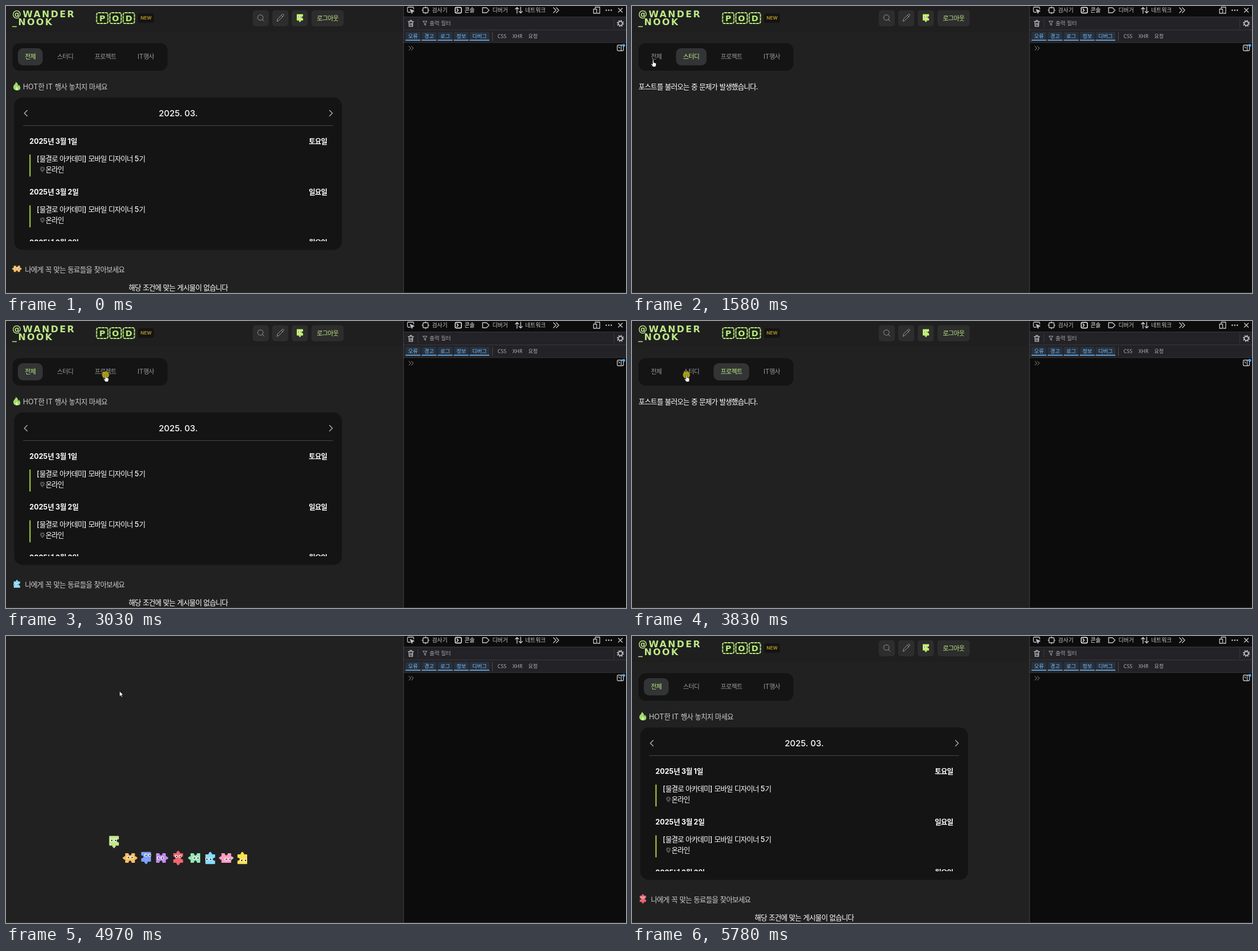
These frames come from a looping animation (1098 px wide and 510 px high, 5850 ms). An HTML page:

```html
<!DOCTYPE html>
<html lang="ko">
<head>
<meta charset="utf-8">
<style>
  html, body { margin: 0; width: 100%; height: 100%; overflow: hidden; background: #212121; }
  svg { display: block; }
  text { font-family: Inter, "Noto Sans CJK KR", "Noto Sans CJK", sans-serif; white-space: pre; }
  .ko { letter-spacing: -.066em; }
  .dev text { font-family: "Noto Sans", "Noto Sans CJK KR", "Noto Sans CJK", sans-serif; }
  .dev .ko { letter-spacing: 0; }
  text.mark { font-family: "DejaVu Sans", sans-serif; font-weight: 700; }
</style>
</head>
<body>
<svg id="stage" width="1098" height="510" viewBox="0 0 1098 510"></svg>
<script>
const LOOP = 5850, BEAT = 200 / 3;
const BG = '#212121', GREEN = '#bde986', LIME = '#a9d83f';

// ---- markup helpers ----
const rect = (x, y, w, h, fill, r = 0, more = '') =>
  `<rect x="${x}" y="${y}" width="${w}" height="${h}" rx="${r}" fill="${fill}" ${more}/>`;
const line = (d, color, w = 1, fill = 'none') =>
  `<path d="${d}" stroke="${color}" stroke-width="${w}" fill="${fill}" stroke-linecap="round" stroke-linejoin="round"/>`;
const dot = (x, y, r, fill, more = '') => `<circle cx="${x}" cy="${y}" r="${r}" fill="${fill}" ${more}/>`;
const group = (x, y, body) => `<g transform="translate(${x} ${y})">${body}</g>`;
// y is the optical middle of the line
const text = (x, y, size, fill, str, more = '') =>
  `<text x="${x}" y="${y + size * .37}" font-size="${size}" fill="${fill}" ${more}>` +
  str.replace(/[가-힣]+/g, run => `<tspan class="ko">${run}</tspan>`) + '</text>';
const MEDIUM = 'font-weight="500"', BOLD = 'font-weight="700"';
const MIDDLE = 'text-anchor="middle"', END = 'text-anchor="end"';

// ---- puzzle pieces: colour, sides (top, right, bottom, left; "+" knob, "-" notch), eye offset ----
const PIECES = [
  ['#c3e88d', '0-+0', -1, -1], ['#fcc062', '-+-+', 0, -1], ['#7da2ff', '00+-', 3, -3],
  ['#c08cf0', '-+-0', -1, 0], ['#ef6671', '+-+-', 0, -3], ['#93e6b5', '-0-+', 1, 0],
  ['#87dcfb', '+-00', -3, 0], ['#ff9ec4', '-+0+', 3, 2], ['#ffe14d', '+00-', 2, 2]
];
function piece(i, x, y, scale = 1, bg = BG, color = PIECES[i][0]) {
  const [, sides, ex, ey] = PIECES[i], H = 8.6;
  const knob = s => sides[s] === '+' ? 2.1 : 0;
  let body = rect(-H, -H, 2 * H, 2 * H, color, .8);
  [...sides].forEach((kind, s) => {
    const shape = kind === '+'
      ? rect(-3, -H - 2.4, 6, 2.8, color, .8) + rect(-1.5, -H - 4.2, 3, 2.5, color, .8)
      : kind === '-' ? rect(-2.6, -H - .3, 5.2, 2.6, bg) + rect(-1.5, -H + 2, 3, 1.8, bg) : '';
    body += `<g transform="rotate(${s * 90})">${shape}</g>`;
  });
  for (const side of [-3.3, 3.3])
    body += rect(ex + side - 2.4, ey - 2.3, 4.8, 4.6, '#fff', 1.4) +
            rect(ex + side - .8, ey - 1, 2.2, 2.3, '#111', .7);
  const dx = knob(3) - knob(1), dy = knob(0) - knob(2);
  return `<g transform="translate(${x} ${y}) scale(${scale}) translate(${dx} ${dy})">${body}</g>`;
}

// ---- page ----
const TABS = [[21, 44, 33.5, '전체'], [78, 54, 90.5, '스터디'], [144.5, 63, 157, '프로젝트'], [220, 54, 233, 'IT행사']];

const header = () =>
  rect(0, 0, 704, 46, '#1f1f1f') +
  `<g fill="${GREEN}" font-size="16" letter-spacing="2.4">` +
  '<text class="mark" x="11" y="20.3">@WANDER</text><text class="mark" x="11" y="34">_NOOK</text></g>' +
  [...'POD'].map((c, i) => {
    const x = 160.5 + 23.5 * i;
    return rect(x, 12, 20, 19, '#1c2413', 3, `stroke="${GREEN}" stroke-width="2" stroke-dasharray="5 1"`) +
      `<text class="mark" x="${x + 10}" y="27" font-size="14.5" fill="${GREEN}" ${MIDDLE}>${c}</text>`;
  }).join('') +
  rect(234, 13, 28, 17, '#141414', 4) +
  text(248, 21.3, 8.2, '#c39c22', 'NEW', MIDDLE + ' font-weight="600"') +
  [437, 471.5, 506].map(x => rect(x, 7.5, 28.5, 28.5, '#2d2d2d', 5)).join('') +
  rect(541, 7.5, 57, 28.5, '#2d2d2d', 5) +
  dot(450.5, 20.5, 4.8, 'none', 'stroke="#999"') + line('M454 24l3 3', '#999') +
  line('M480 27l1-4 8-8q1.5-1 2.5 0t0 2.5l-8 8zM487.5 16.5l2.5 2.5', '#999') +
  piece(0, 520.5, 21.5, .65, '#2d2d2d', '#c2f36b') +
  text(569.5, 21.5, 11.2, GREEN, '로그아웃', `${MIDDLE} ${MEDIUM}`);

const tabBar = active =>
  rect(11.5, 66, 274.5, 49, '#141414', 13) +
  TABS.map(([x, w, tx, label], i) =>
    (i === active ? rect(x, 75, w, 30.5, '#333435', 9) : '') +
    text(tx, 90, 11.1, i === active ? GREEN : '#999', label, i === active ? MEDIUM : '')
  ).join('');

const dayRow = (day, week, y) =>
  text(41.5, y, 12.6, '#fff', `2025년 3월 ${day}일`, BOLD) +
  text(568.5, y, 12.6, '#fff', week, `${BOLD} ${END}`) +
  rect(41.5, y + 24, 2, 39, LIME) +
  text(54.5, y + 31.5, 12.6, '#fff', '[물결로 아카데미] 모바일 디자이너 5기', MEDIUM) +
  `<path d="M64.5 ${y + 55.5}c-6-5-5-10 0-10s6 5 0 10z" fill="#505050"/>` +
  dot(64.5, y + 49.5, 1.5, '#141414') +
  text(70, y + 50.3, 12.6, '#fff', '온라인', MEDIUM);

const board = () =>
  '<path d="M17 135c4 2 5 5 4 8l2-3c4 5 3 10-3.500 10s-8-6-5-10c2-2 3-3 2.500-5z" fill="#9fdc6c"/>'.replace(/\.500/g, '.5') +
  '<path d="M19 143.5c2.5 2.500 2.500 6 0 6s-2.500-3.500 0-6z" fill="#dff7a8"/>'.replace(/\.500/g, '.5') +
  text(30, 143, 12.6, '#ccc', 'HOT한 IT 행사 놓치지 마세요') +
  rect(14.5, 162.5, 580.5, 271, '#141414', 15) +
  line('M37.5 185.5l-5 5 5 5M573 185.5l5 5-5 5', '#aaa', 1.5) +
  text(305, 190, 15.1, '#fff', '2025. 03.', `${MIDDLE} ${MEDIUM}`) +
  rect(30.5, 212, 548.5, 1, '#484848') +
  '<g clip-path="url(#list)">' +
  ['토', '일', '월'].map((d, i) => dayRow(i + 1, d + '요일', 240 + 90.3 * i)).join('') + '</g>' +
  text(33.5, 468.5, 12.66, '#ccc', '나에게 꼭 맞는 동료들을 찾아보세요') +
  text(305, 500, 12.66, '#fff', '해당 조건에 맞는 게시물이 없습니다', `${MIDDLE} ${MEDIUM}`);

const failure = () => text(11.5, 143, 12.66, '#fff', '포스트를 불러오는 중 문제가 발생했습니다.', MEDIUM);

// ---- developer tools ----
function devtools() {
  const edge = '#38383d', ink = '#c8c8ca', blue = '#75bfff';
  const tabs = [[754.5, '검사기', ink], [812, '콘솔', '#fff'], [861.5, '디버거', ink], [919.5, '네트워크', ink]];
  const filters = [[707.5, 26.5, '오류'], [736, 26.5, '경고'], [764.5, 26.5, '로그'], [793, 26.5, '정보'], [821, 35, '디버그']];
  let out = rect(704, 0, 394, 510, '#0c0c0d') + rect(704, 20, 394, 45, '#232327') +
    [19, 42, 64.5].map(y => rect(704, y, 394, 1, edge)).join('') +
    rect(703.5, 0, 1, 510, '#444448');
  out += tabs.map(([x, s, c]) => text(x, 7.3, 9.9, c, s)).join('');
  // panel icons
  out += line('M716 11h-3.5q-1.5 0-1.5-1.5v-6q0-1.5 1.5-1.5h8q1.5 0 1.5 1.5v2', ink, 1.3) +
    line('M716 6l7 3-3 1-1 3z', ink, 1, ink) +
    rect(738.5, 3, 9, 9, 'none', 1.5, `stroke="${ink}" stroke-width="1.4"`) +
    line('M743 1v2M743 12v2M736.5 7.5h2M747.5 7.5h2', ink, 1.2) +
    rect(795.5, 2.5, 11, 10, 'none', 2, 'stroke="#fff" stroke-width="1.4"') + line('M798.5 5l2.5 2.5-2.5 2.5', '#fff', 1.3) +
    line('M844 3h7l4.5 4.5-4.5 4.5h-7z', ink, 1.4) +
    line('M905 13V2.5l-3 3M905 2.5l3 3M911.5 2v10.5l-3-3M911.5 12.5l3-3', ink, 1.4) +
    line('M969.5 3l4.5 4.5-4.5 4.5M974.5 3l4.5 4.5-4.5 4.5', ink, 1.3) +
    line('M1043.5 4v-2h8v11h-4M1040.5 5.5h5.5v7.5h-5.5z', ink, 1.3) +
    [1063, 1067.5, 1072].map(x => dot(x, 7.5, 1.3, ink)).join('') +
    line('M1084.5 4l7 7M1091.5 4l-7 7', ink, 1.4);
  // filter rows
  out += line('M712 27.5h10M715.5 27v-1.5h3v1.5M713.5 28l.5 8.5h6l.5-8.5M716 30v4.5M718.5 30v4.5', ink, 1.2) +
    rect(729, 23, 1, 15, edge) + line('M738.5 27h7l-2.5 3.5v4l-2-1.5v-2.5z', '#aaa') +
    text(750, 30.8, 9.6, '#a0a0a4', '출력 필터') + rect(1076, 22, 1, 18, edge) +
    dot(1088, 31, 3.6, 'none', `stroke="${ink}" stroke-width="1.6"`) +
    dot(1088, 31, 5.2, 'none', `stroke="${ink}" stroke-width="1.8" stroke-dasharray="2 2.08"`);
  out += filters.map(([x, w, s]) => rect(x, 46, w, 15, '#28313d', 2) + rect(x, 60, w, 1.5, blue) +
    text(x + w / 2, 53.5, 9.3, blue, s, MIDDLE)).join('') +
    rect(861, 46, 1, 16, '#4a4a4f') +
    [[870.5, 'CSS'], [897, 'XHR'], [925, '요청']].map(([x, s]) => text(x, 53.5, 9, '#b1b1b3', s)).join('');
  // console
  out += line('M713.5 71.5l3.5 3.5-3.5 3.5M718 71.5l3.5 3.5-3.5 3.5', '#999') +
    rect(1082.5, 69.5, 11, 10, 'none', 2, `stroke="${ink}" stroke-width="1.3"`) +
    line('M1089.5 70v9M1085 72.5l2 2', ink, 1.2) + dot(1094, 70, 2.5, '#4aa8ff');
  return `<g class="dev">${out}</g>`;
}

// ---- timeline: start, view, active tab, head start of the piece cycle ----
const SCENES = [
  [0, 'board', 0, 90], [1190, 'failure', 1], [1990, 'loader'], [2590, 'board', 0],
  [3100, 'failure', 2], [3970, 'failure', 1], [4910, 'loader'], [5510, 'board', 0]
];
const CLICKS = [1060, 1850, 2960, 3830, 4640];
const PATH = [
  [70, 948, 100], [720, 62, 77], [1000, 96, 93], [1190, 96, 93], [1330, 84, 100], [1430, 55, 102],
  [1510, 34, 101], [1570, 38, 95], [2000, 38, 95], [2400, 151, 98], [2700, 177, 95], [3300, 177, 95],
  [3580, 97, 95], [4100, 97, 95], [4290, 50, 94], [4780, 50, 94], [4970, 201, 98], [5170, 855, 100], [5235, 855, 100]
];

function pointer(t) {
  const k = PATH.findIndex(p => p[0] > t);
  if (k < 1) return null;
  const [a, b] = [PATH[k - 1], PATH[k]];
  const u = (t - a[0]) / (b[0] - a[0]), e = u * u * (3 - 2 * u);
  return [a[1] + (b[1] - a[1]) * e, a[2] + (b[2] - a[2]) * e];
}
const ARROW = '<path d="M0 0v9.5l2.2-2 1.5 3.2 1.6-.7-1.5-3.2h3z" fill="#fff" stroke="#000" stroke-width=".7"/>';
const HAND = '<path d="M-1.5 1.5q1-1.5 2 0v4l3.5 1q1 .4 .9 1.5l-.6 3.5-.8 1.5h-4.5l-3-4.5q0-1.3 1.2-.8l1.3 1z" fill="#fff" stroke="#000" stroke-width=".6"/>';

// ---- assembly ----
const stage = document.getElementById('stage');
stage.innerHTML =
  '<defs><clipPath id="list"><rect x="15" y="214" width="580" height="204"/></clipPath></defs>' +
  rect(0, 0, 1098, 510, BG) +
  `<g id="header">${header()}</g><g id="tabs"></g><g id="board">${board()}</g><g id="failure">${failure()}</g>` +
  '<g id="pieces"></g>' + devtools() + rect(0, 509, 1098, 1, '#343436') + '<g id="pointer"></g>';
const part = id => stage.querySelector('#' + id);
const show = (id, on) => part(id).setAttribute('visibility', on ? 'visible' : 'hidden');
const last = {};
const fill = (id, html) => { if (last[id] !== html) part(id).innerHTML = last[id] = html; };

function draw(t) {
  const [from, view, tab, lead = 0] = SCENES.filter(s => s[0] <= t).pop();
  const beat = Math.floor((t - from + lead) / BEAT) % 9, loading = view === 'loader';
  show('header', !loading);
  show('board', view === 'board');
  show('failure', view === 'failure');
  fill('tabs', loading ? '' : tabBar(tab));
  fill('pieces', loading
    ? PIECES.map((_, i) => piece(i, 191.3 + 28.4 * i, i === beat ? 366 : 394.5)).join('')
    : view === 'board' ? piece(beat, 19.3, 467, .65) : '');

  const pos = pointer(t);
  if (!pos) return fill('pointer', '');
  const [x, y] = pos;
  const hover = !loading && y >= 75 && y <= 105 && TABS.some(([tx, w]) => x >= tx && x <= tx + w);
  const pressed = CLICKS.some(c => t >= c && t < c + 140);
  fill('pointer', (pressed ? dot(x - .6, y + .8, 6.3, '#b9ae0c', 'opacity=".88"') : '') +
    group(x, y, hover ? HAND : ARROW));
}

function tick() {
  draw(performance.now() % LOOP);
  requestAnimationFrame(tick);
}
tick();
</script>
</body>
</html>
```
